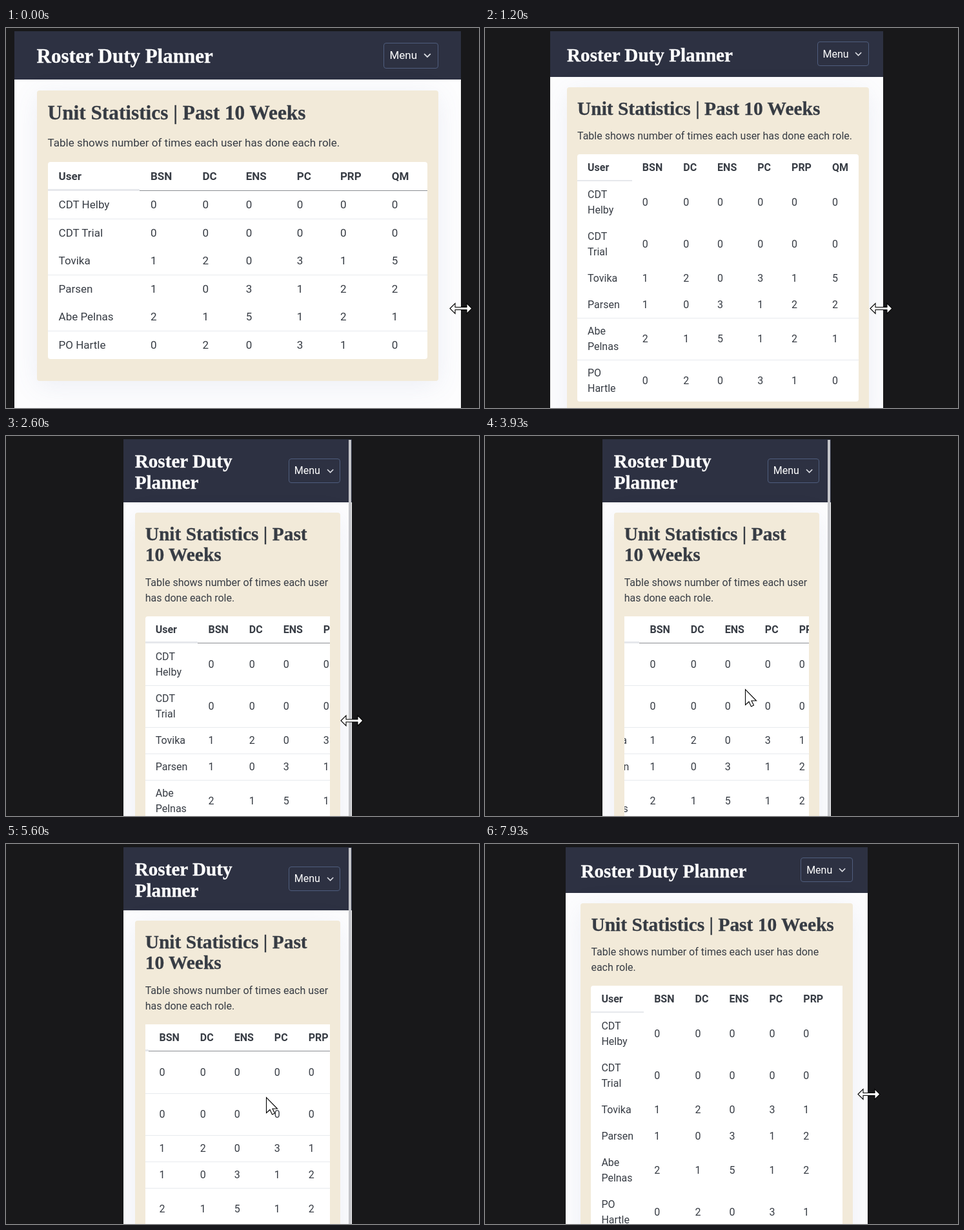
An HTML page for the animation above (8000 ms loop, 733 px wide and 590 px high).

```html
<!DOCTYPE html>
<html lang="en">
<head>
<meta charset="utf-8">
<title>Responsive table</title>
<style>
  html, body { margin: 0; width: 100%; height: 100%; overflow: hidden; background: #18181a; }
  body { position: relative; contain: strict; }
  #page { position: absolute; top: 5px; bottom: 0; overflow: clip; contain: strict; background: #fdfdfe;
    font-family: Roboto, sans-serif; line-height: 1.5; color: #373c44; }
  h1, h2 { position: relative; margin: 0; font-family: "Liberation Serif", serif; -webkit-text-stroke: .3px; }
  h1 { top: 2px; font-size: 1.823em; line-height: 1.111; }
  h2 { top: 1px; font-size: 1.84em; line-height: 1.1005; padding-right: 4px; }
  nav { background: #2d3142; color: #fff; }
  .bar { width: 90%; margin: 0 auto; padding: 1.03em 0; display: flex;
    align-items: center; justify-content: space-between; }
  .menu { flex: none; box-sizing: border-box; width: 5.03em; height: 2.375em; padding: 1px .6em 0 .5em;
    display: flex; align-items: center; justify-content: space-between;
    border: 1px solid #4f5d7d; border-radius: 4px; }
  .menu svg { width: .7em; fill: none; stroke: #dcdee4; stroke-width: 1.6; }
  main { box-sizing: border-box; width: 90%; margin: 1em auto 0; padding: 1em 1em 2em;
    background: #f2ead9; border-radius: 4px; box-shadow: 0 8px 42px rgba(90, 110, 170, .1); }
  p { margin: 1em 0; }
  #scroller { overflow: hidden; }
  table { width: 100%; border-spacing: 0; background: #fff; border-radius: 4px; overflow: hidden; text-align: left; }
  td, th { padding: calc(.5em + 1px) 1em .5em; }
  th { padding-bottom: calc(.5em + 1px); }
  th:first-child { box-shadow: inset 0 -2px #e6e8ec; }
  .ruled th { box-shadow: inset 0 -1px #8b8d92; }
  .ruled th:first-child { box-shadow: inset 0 -3px #e6e8ec; }
  tr.line td { box-shadow: inset 0 1px #e7eaee; }
  #thumb { position: absolute; top: 1px; right: 1px; width: 4px; height: 100%; background: #c4c5c9; }
  #cursor { position: absolute; left: 0; top: 0; overflow: visible; fill: #fff; stroke: #000; stroke-width: 1.1; }
</style>
</head>
<body>
<div id="page">
  <div id="content">
    <nav><div class="bar">
      <h1>Roster Duty Planner</h1>
      <div class="menu">Menu <svg viewBox="0 0 11 7"><path d="M1 1l4.5 4.5L10 1"/></svg></div>
    </div></nav>
    <main>
      <h2>Unit Statistics | Past 10 Weeks</h2>
      <p>Table shows number of times each user has done each role.</p>
      <div id="scroller"><table id="table"></table></div>
    </main>
  </div>
  <div id="thumb"></div>
</div>
<svg id="cursor" width="1" height="1">
  <path id="resize" d="M-17 0l8-8v6h18v-6l8 8-8 8v-6h-18v6z"/>
  <path id="arrow" d="M.5.5v24l5.5-5 3.500 7.500 4-2-3.500-7h7.500z"/>
</svg>
<script>
const LOOP = 8000, FRAME = 1000 / 15, STAGE = 718;
const $ = id => document.getElementById(id);
const [page, content, table, thumb, cursor, resize, arrow] =
  ['page', 'content', 'table', 'thumb', 'cursor', 'resize', 'arrow'].map($);

const users = [
  ['CDT Helby', '000000'], ['CDT Trial', '000000'], ['Tovika', '120315'],
  ['Parsen', '103122'], ['Abe Pelnas', '215121'], ['PO Hartle', '020310']
];
const row = (cells, tag) => `<tr>${cells.map(c => `<${tag}>${c}</${tag}>`).join('')}</tr>`;
table.innerHTML = row(['User', 'BSN', 'DC', 'ENS', 'PC', 'PRP', 'QM'], 'th') +
  users.map(([name, counts]) => row([name, ...counts], 'td')).join('');
const rows = [...table.rows].slice(1);

const ramp = (t, from, to) => Math.min(1, Math.max(0, (t - from) / (to - from)));
const mix = (a, b, u) => a + (b - a) * u;

// The viewport narrows with an ease-out, then widens at constant speed.
function leftEdge(t) {
  const shrink = 1 - (1 - ramp(t, 300, 2580)) ** 1.475;
  return Math.round(mix(13, 182, shrink) - 57 * ramp(t, 7325, 7933));
}
const widthAt = t => STAGE - 2 * leftEdge(t);

function draw(now) {
  const t = Math.floor((now % LOOP + 5) / FRAME) * FRAME;
  // While narrowing, the content reflows slightly behind the viewport.
  const width = widthAt(t < 2600 ? t - 32 : t);
  const wide = width >= 576;
  const narrow = t > 1980 && t < 7500;

  page.style.left = leftEdge(t) + 'px';
  page.style.width = widthAt(t) + 'px';
  page.style.fontSize = (wide ? 17 : 16) + 'px';
  content.style.width = width + 'px';
  thumb.hidden = !narrow;

  table.classList.toggle('ruled', wide || narrow);
  rows.forEach((r, i) =>
    r.classList.toggle('line', i > 0 && (wide ? i % 2 === 1 : narrow || t < 1980 && i > 3)));
  const scroll = 149 * (ramp(t, 3467, 4664) - ramp(t, 5067, 6155));
  table.style.transform = `translateX(${-Math.round(scroll)}px)`;

  // The cursor drags the right edge, except while it rests over the table.
  const rest = ramp(t, 2867, 3067) - ramp(t, 6667, 6933);
  const dragX = t < 7390 ? STAGE - leftEdge(t + 32) : mix(559.5, 595, ramp(t, 7400, 7933));
  const dragY = t < 5000 ? mix(435.5, 442, ramp(t, 1200, 2000)) : 388.5;
  cursor.style.transform = `translate(${mix(dragX, 403, rest)}px, ${mix(dragY, 393, rest)}px)`;
  arrow.style.display = rest > 0 ? '' : 'none';
  resize.style.display = rest > 0 ? 'none' : '';
  requestAnimationFrame(draw);
}
requestAnimationFrame(draw);
</script>
</body>
</html>
```
